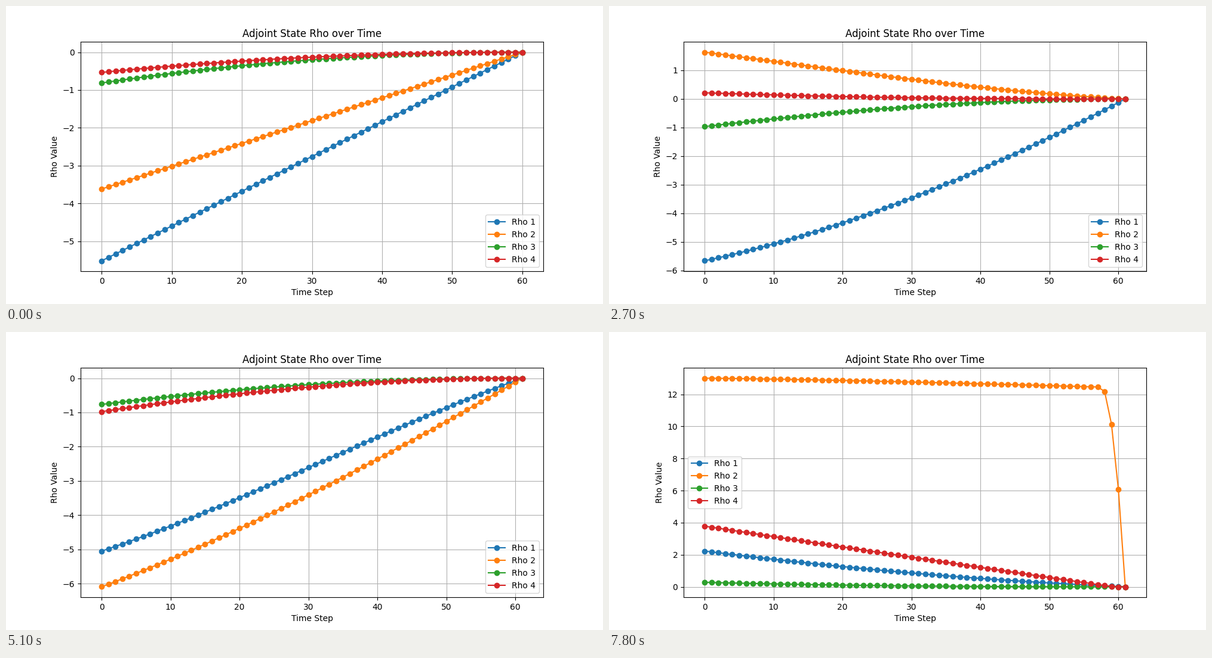
Animation of 1000 by 500 pixels, one loop 8000 ms. Source, as a matplotlib script:

```python
import numpy as np
import matplotlib.pyplot as plt
from matplotlib.animation import FuncAnimation

TICK = 100         # ms per animation frame
HOLD = 3           # animation frames per plotted step
LOOP = 8000
DT = 0.005


def ramp(start, bend=0, skew=0):
    """Cubic falling to zero as the remaining share s goes from 1 to 0."""
    return lambda s: s * (start + (1 - s) * (bend + skew * (2 * s - 1)))


def ledge(s):
    """Slowly sinking plateau that drops to zero at the very end."""
    return (13.01 - 0.6 * (1 - s) ** 1.3) * (1 - np.clip(1 - 17.4 * s, 0, 1) ** 2)


# step -> shapes of rho 1 and rho 2
POSES = {
    0: (ramp(-5.52), ramp(-3.62)),
    7: (ramp(-6.06, -2.5, -0.47), ramp(0.22, 0.97, -0.2)),
    11: (ramp(-5.31, -2.15), ramp(2.86, -1.92, 0.72)),
    14: (ramp(-5.15, -0.86, -1.5), ramp(-5.48, -3.8, -0.65)),
    19: (ramp(-4.99, 0.25, -0.4), ramp(-6.45, 0.26)),
    23: (ramp(1.297, 2.5, 0.55), ramp(-1.88, -0.28)),
    26: (ramp(2.23, -1.08), ledge),
}


def blend(step, s):
    a = max(k for k in POSES if k <= step)
    b = min(k for k in POSES if k >= step)
    u = ((step - a) / max(b - a, 1)) ** 0.9
    return [(1 - u) * f(s) + u * g(s) for f, g in zip(POSES[a], POSES[b])]


def integrate(rho):
    """Backward sum over all later steps, zero at the end."""
    return DT * (np.cumsum(rho[::-1])[::-1] - rho)


def state(step):
    last = 60 if step <= 7 else 61
    t = np.arange(last + 1)
    rho1, rho2 = blend(step, 1 - t / last)
    return t, (rho1, rho2, integrate(rho1), integrate(rho2))


fig, ax = plt.subplots(figsize=(10, 5), dpi=100)


def draw(i):
    ax.clear()
    t, rows = state(i // HOLD)
    for n, row in enumerate(rows, 1):
        ax.plot(t, row, marker="o", label=f"Rho {n}")
    ax.set_title("Adjoint State Rho over Time")
    ax.set_xlabel("Time Step")
    ax.set_ylabel("Rho Value")
    ax.grid(True)
    ax.legend(loc="best")
    return ax.lines


anim = FuncAnimation(fig, draw, frames=LOOP // TICK, interval=TICK,
                     repeat=True, repeat_delay=0)
plt.show()
```
